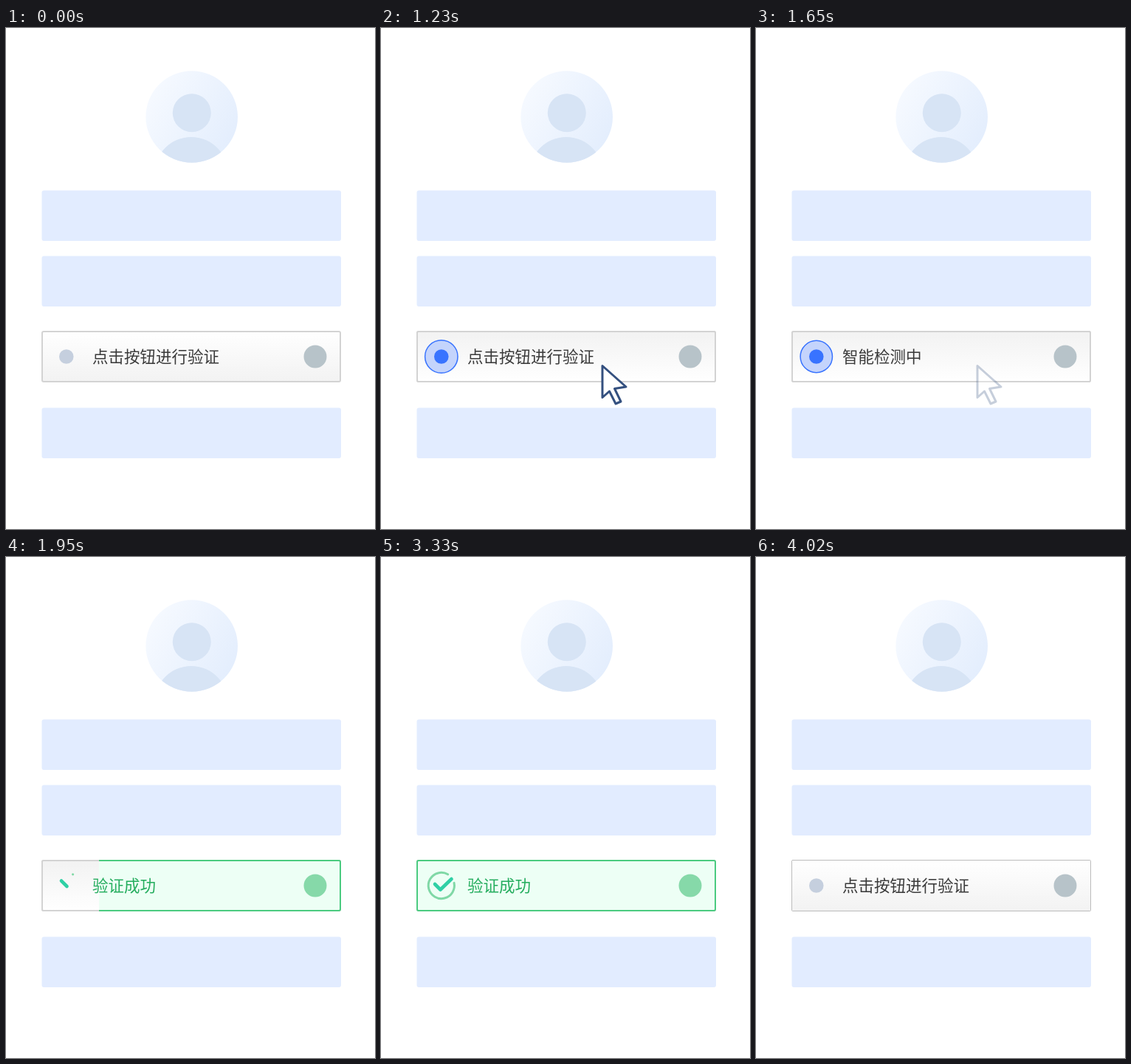
These frames come from a looping animation (500 px wide and 680 px high, 4.2 s). An HTML page with a canvas:

```html
<!DOCTYPE html>
<html lang="zh-CN">
<head>
<meta charset="utf-8">
<title>点击验证</title>
<style>
  html, body { margin: 0; width: 100%; height: 100%; overflow: hidden; background: #fff; }
  canvas { display: block; }
</style>
</head>
<body>
<canvas id="stage" width="500" height="680"></canvas>
<script>
const ctx = document.getElementById('stage').getContext('2d');
const LOOP = 4200, STEP = 30;
const FONT = '21.5px "Noto Sans CJK SC", "Noto Sans CJK", sans-serif';
const BLUE = '#3873ff';
const BOX = { x: 48, y: 411, w: 406, h: 70 };
const DOT = { x: 81.8, y: 446 };
const CURSOR = new Path2D('M300 458.5V501.5L309.5 493L318 510L325 507L316.5 489.5L332 487Z');
const CHECK = [[73, 444], [80.5, 451.5], [95.5, 437]];

const progress = (t, from, to) => Math.min(1, Math.max(0, (t - from) / (to - from)));
const easeOut = p => 1 - (1 - p) ** 3;
const easeInOut = (p, n) => p < .5 ? (2 * p) ** n / 2 : 1 - (2 - 2 * p) ** n / 2;

function layer(alpha, draw) {
  if (alpha <= 0) return;
  ctx.save();
  ctx.globalAlpha *= alpha;
  draw();
  ctx.restore();
}

function circle(x, y, r, fill) {
  ctx.beginPath();
  ctx.arc(x, y, r, 0, Math.PI * 2);
  ctx.fillStyle = fill;
  ctx.fill();
}

function roundRect(x, y, w, h, r) {
  ctx.beginPath();
  ctx.roundRect(x, y, w, h, r);
}

function gradient(x0, y0, x1, y1, from, to) {
  const g = ctx.createLinearGradient(x0, y0, x1, y1);
  g.addColorStop(0, from);
  g.addColorStop(1, to);
  return g;
}

function label(text, color) {
  ctx.font = FONT;
  ctx.fillStyle = color;
  ctx.fillText(text, 117, 454);
}

function strokeStyle(color, width) {
  ctx.strokeStyle = color;
  ctx.lineWidth = width;
  ctx.lineCap = ctx.lineJoin = 'round';
}

function drawPage() {
  ctx.fillStyle = '#fff';
  ctx.fillRect(0, 0, 500, 680);
  for (const y of [220.5, 309.5, 515.5]) {
    roundRect(48.5, y, 405.5, 68.5, 3);
    ctx.fillStyle = '#e2ecff';
    ctx.fill();
  }
  ctx.save();
  circle(251.7, 120.5, 62.3, gradient(200, 90, 305, 150, '#f5f9ff', '#e4eefd'));
  ctx.clip();
  circle(251.8, 115.2, 26, '#d7e4f5');
  circle(251, 198, 50, '#d7e4f5');
  ctx.restore();
}

function drawButton(background, border, badge, width = 2) {
  const inset = width / 2;
  roundRect(BOX.x + inset, BOX.y + inset, BOX.w - width, BOX.h - width, width);
  ctx.fillStyle = background;
  ctx.fill();
  strokeStyle(border, width);
  ctx.stroke();
  circle(419, 446, 15.5, badge);
}

function drawGreyButton(hover, thin) {
  const shade = (a, b) => gradient(0, BOX.y, 0, BOX.y + BOX.h, a, b);
  const width = thin ? 1 : 2;
  const border = thin ? '#bcbcbc' : '#d3d3d3';
  drawButton(shade('#ffffff', '#f2f2f2'), border, '#b7c3c9', width);
  layer(hover, () => drawButton(shade('#f2f2f2', '#ffffff'), border, '#b7c3c9', width));
}

function drawIndicator(t) {
  const grow = easeOut(progress(t, 930, 1200));
  const shrink = 1 - easeInOut(progress(t, 1710, 1890), 2);
  const drift = .5 * progress(t, 1230, 1650);
  if (t < 1200) circle(DOT.x, DOT.y, 9.8, '#c5cfde');
  if (grow > 0 && shrink > 0) {
    circle(DOT.x, DOT.y, (10 + 12.2 * grow - drift) * shrink, '#c4d4fc');
    strokeStyle(BLUE, 1.5);
    ctx.stroke();
    layer(grow, () => circle(DOT.x, DOT.y, 9.8 * shrink, BLUE));
  }
}

// Strokes the leading part of a polyline.
function partialLine(points, part) {
  const lengths = points.slice(1).map((p, i) => Math.hypot(p[0] - points[i][0], p[1] - points[i][1]));
  let left = part * lengths.reduce((a, b) => a + b);
  ctx.beginPath();
  ctx.moveTo(...points[0]);
  lengths.forEach((length, i) => {
    const k = Math.min(1, Math.max(0, left / length));
    const [x0, y0] = points[i], [x1, y1] = points[i + 1];
    ctx.lineTo(x0 + (x1 - x0) * k, y0 + (y1 - y0) * k);
    left -= length;
  });
  ctx.stroke();
}

function drawTick(t) {
  if (t < 1950) return;
  const arc = Math.max(.002, easeInOut(progress(t, 1950, 2400), 2));
  const start = -1.04;
  ctx.beginPath();
  ctx.arc(DOT.x, DOT.y, 17.6, start, start - arc * 5.45, true);
  strokeStyle('#80d8a6', 3);
  ctx.stroke();

  const part = Math.max(.002, easeInOut(progress(t, 1950, 2310), 2));
  const settle = 1 - easeOut(progress(t, 1950, 2130));
  ctx.save();
  ctx.translate(2 * settle, -4.5 * settle);
  strokeStyle('#2fd0a5', 4.6);
  partialLine(CHECK, part);
  ctx.restore();
}

function drawSuccess(t) {
  const wipe = easeInOut(progress(t, 1845, 2010), 3);
  ctx.save();
  ctx.beginPath();
  ctx.rect(BOX.x + BOX.w * (1 - wipe), BOX.y, BOX.w * wipe, BOX.h);
  ctx.clip();
  drawButton('#edfff5', '#4bcb80', '#86d9a9');
  ctx.restore();
  drawTick(t);
  label('验证成功', '#25ad5e');
}

function drawCursor(t) {
  const alpha = progress(t, 930, 1170) * (1 - progress(t, 1470, 1720));
  layer(alpha, () => {
    ctx.fillStyle = '#fff';
    ctx.fill(CURSOR);
    strokeStyle('#34507f', 3);
    ctx.stroke(CURSOR);
  });
}

function drawIdle(t) {
  drawGreyButton(0, t >= 4020);
  circle(DOT.x, DOT.y, 9.8, '#c5cfde');
  label('点击按钮进行验证', '#3a3a3a');
}

function render(t) {
  drawPage();
  if (t >= 4020) return drawIdle(t);
  drawGreyButton(progress(t, 930, 1230));
  drawIndicator(t);
  if (t < 1470) label('点击按钮进行验证', '#3a3a3a');
  else if (t < 1860) label('智能检测中', '#3a3a3a');
  if (t >= 1860) drawSuccess(t);
  drawCursor(t);
  layer(easeInOut(progress(t, 3780, 4020), 2), () => drawIdle(t));
}

function frame() {
  const t = performance.now() % LOOP;
  render(Math.floor(t / STEP) * STEP);
  requestAnimationFrame(frame);
}
frame();
</script>
</body>
</html>
```
